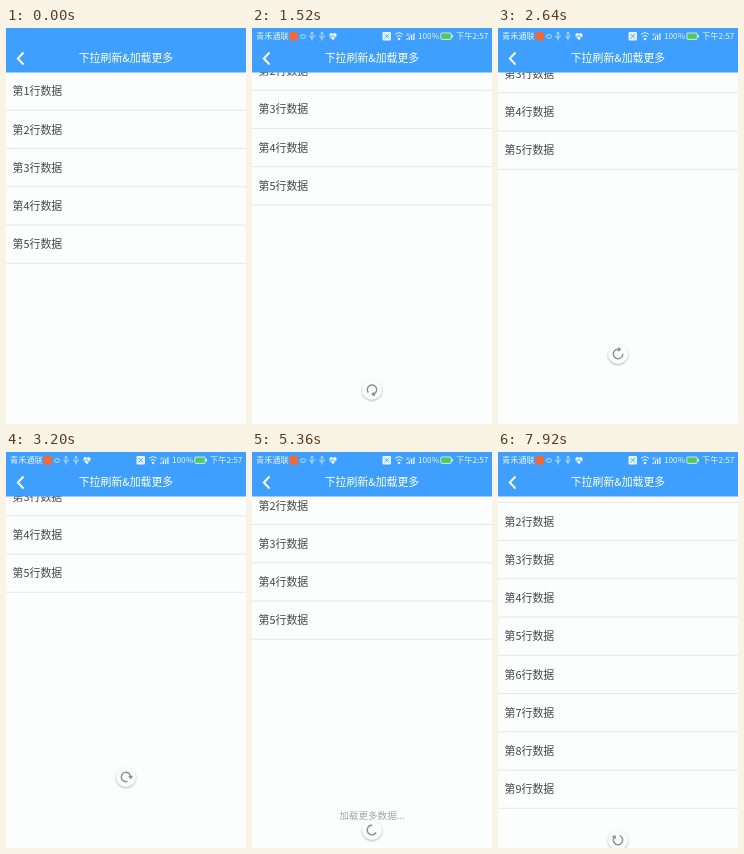
An HTML page for the animation above (8 s loop, 240 by 396 pixels).

```html
<!DOCTYPE html>
<html lang="zh-CN">
<head>
<meta charset="utf-8">
<title>下拉刷新&amp;加载更多</title>
<style>
html, body { margin: 0; width: 100%; height: 100%; overflow: hidden; background: #fcfefd; }
svg { display: block; width: 100vw; height: 100vh; }
text { font-family: "Noto Sans CJK SC", "Noto Sans CJK", "Noto Sans", sans-serif; }
</style>
</head>
<body>
<svg viewBox="0 0 240 396">
  <defs>
    <filter id="blur" x="-50%" y="-50%" width="200%" height="200%">
      <feGaussianBlur stdDeviation="1.2"/>
    </filter>
  </defs>
  <rect width="240" height="396" fill="#fcfefd"/>
  <g id="list" font-size="10.9" fill="#444"></g>
  <text id="hint" x="120" y="366.6" font-size="9.6" fill="#a2a6a8" text-anchor="middle">加载更多数据...</text>
  <g id="spinner">
    <circle cy="1" r="10" fill="#000" opacity=".28" filter="url(#blur)"/>
    <circle r="10" fill="#fcfcfc"/>
    <path id="arc" fill="none" stroke="#888c90" stroke-width="1.4"/>
    <path id="head" d="M-2.6 -.6H2.6L0 2.6Z" fill="#888c90"/>
  </g>
  <rect width="240" height="44.5" fill="#3f9ffe"/>
  <path d="M17.5 24.5L11.8 30.5L17.5 36.5" fill="none" stroke="#fff" stroke-width="1.9"/>
  <text x="120" y="34.1" font-size="10.9" fill="#fff" text-anchor="middle">下拉刷新&amp;加载更多</text>
  <g id="status" fill="#e8f4ff" font-size="8.2">
    <text x="4" y="11.2">青禾通联</text>
    <rect x="37.5" y="4" width="8.5" height="8.5" rx="1" fill="#ee6a3c"/>
    <ellipse cx="51" cy="8.5" rx="2.6" ry="1.8" fill="none" stroke="#d8ecff" stroke-width=".8"/>
    <g fill="none" stroke="#d8ecff" stroke-width=".8">
      <path id="usb" d="M60 12.5V4.5M58.8 6L60 4.2L61.2 6M58 7.5V9L60 10.5L62 8.5V7"/>
      <use href="#usb" x="10"/>
    </g>
    <path d="M81 12.2L77.6 8.6Q76.8 5.2 79.4 5Q80.5 5 81 6.2Q81.5 5 82.6 5Q85.2 5.2 84.4 8.6Z"/>
    <path d="M78 8.6H80L81 7.2L82 9.4H84" fill="none" stroke="#3f9ffe" stroke-width=".7"/>
    <rect x="130.5" y="4" width="8.5" height="8.5" rx="1"/>
    <path d="M132.5 6L137 10.5M137 6L132.5 10.5" stroke="#3f9ffe" stroke-width=".9"/>
    <path d="M143 6.5Q147 3 151 6.5M144.5 8.6Q147 6.4 149.5 8.6" fill="none" stroke="#e8f4ff"/>
    <circle cx="147" cy="11" r="1.3"/>
    <path d="M155 12V10.5M157.3 12V8.6M159.6 12V6.8M161.9 12V5" stroke="#e8f4ff" stroke-width="1.3"/>
    <text x="154" y="7.5" font-size="4">4G</text>
    <text x="166" y="11.2">100%</text>
    <rect x="188.8" y="5" width="10.4" height="6.4" rx="1" fill="#52c95a" stroke="#e8f4ff" stroke-width=".8"/>
    <rect x="199.6" y="7" width="1.4" height="2.4"/>
    <text x="204" y="11.2">下午2:57</text>
  </g>
</svg>
<script>
const LOOP = 8000, STEP = 80, ROW = 38.25, TOP = 44;
const LOAD_START = 3600, LOAD_END = 7760, CYCLE = 1333, R = 4.7;
const $ = id => document.getElementById(id);

const scrollKeys = [[0, 0], [560, 0], [880, -9], [1040, -23], [1760, -76], [2160, -88],
  [2640, -94], [3200, -95], [3280, -95], [3520, -52], [3600, -48], [7680, -48], [7760, -44], [7920, -32]];
const sinkKeys = [[3520, 0], [3600, 6], [7680, 6], [7840, 0]];
const turnKeys = [[960, -60], [2160, 215], [3200, 355], [3520, 215]];

$("list").innerHTML = Array.from({ length: 9 }, (_, i) => {
  const y = TOP + i * ROW;
  return `<g><text x="6.6" y="${y + 23.3}">第${i + 1}行数据</text>
    <path d="M0 ${y + ROW}H240" stroke="#e6e8e8"/></g>`;
}).join("");
const rows = [...$("list").children];

function track(keys, t) {
  if (t <= keys[0][0]) return keys[0][1];
  for (let i = 1; i < keys.length; i++) {
    const [a, u] = keys[i - 1], [b, v] = keys[i];
    if (t <= b) return u + (v - u) * (t - a) / (b - a);
  }
  return keys[keys.length - 1][1];
}

const ease = x => {
  x = Math.min(1, Math.max(0, x));
  return x * x * (3 - 2 * x);
};

function point(deg) {
  const a = deg * Math.PI / 180;
  return `${(R * Math.cos(a)).toFixed(2)} ${(R * Math.sin(a)).toFixed(2)}`;
}

function drawArc(from, to) {
  $("arc").setAttribute("d", `M${point(from)}A${R} ${R} 0 ${to - from > 180 ? 1 : 0} 1 ${point(to)}`);
}

function drawSpinner(t, loading) {
  $("head").style.display = loading ? "none" : "";
  if (loading) {
    const turns = (t - 3160) / CYCLE, k = Math.floor(turns), p = turns - k;
    const base = 43 + 216 * turns + 288 * k;
    drawArc(base + 288 * ease(p * 2 - 1), base + 288 * ease(p * 2) + 18);
  } else {
    const tip = track(turnKeys, t);
    drawArc(tip - 285, tip);
    $("head").setAttribute("transform", `translate(${point(tip)}) rotate(${tip})`);
  }
}

function render(t) {
  const scroll = track(scrollKeys, t);
  const loading = t >= LOAD_START && t < LOAD_END;
  $("list").setAttribute("transform", `translate(0 ${scroll})`);
  rows.forEach((row, i) => row.style.display = i < 5 || t >= LOAD_END ? "" : "none");
  $("status").style.display = t < STEP ? "none" : "";
  $("hint").style.display = loading ? "" : "none";
  $("spinner").setAttribute("transform", `translate(120 ${420 + scroll + track(sinkKeys, t)})`);
  drawSpinner(t, loading);
}

const start = performance.now();
function tick() {
  const t = (performance.now() - start) % LOOP;
  render(Math.floor(t / STEP) * STEP);
  requestAnimationFrame(tick);
}
tick();
</script>
</body>
</html>
```
